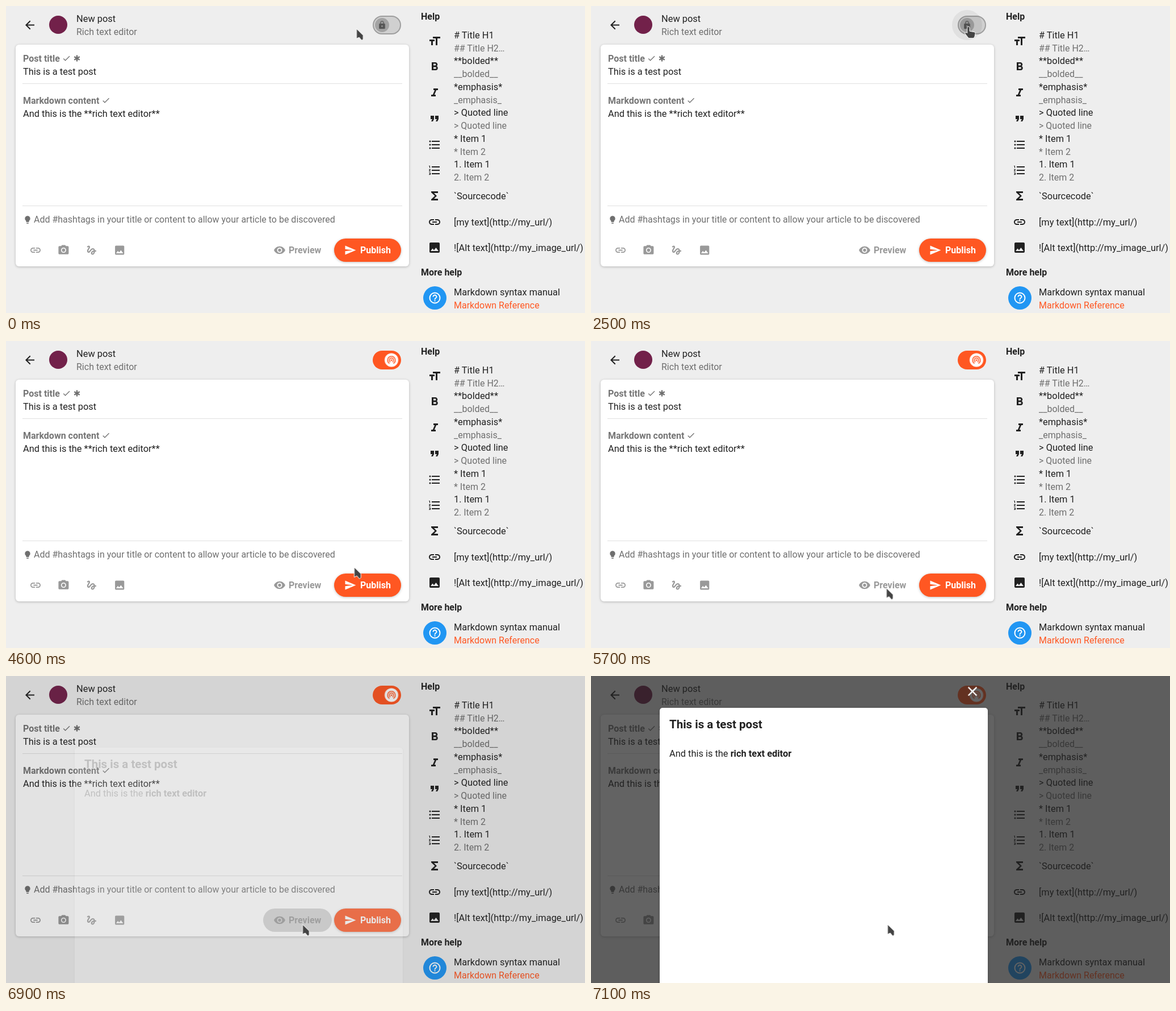
Write an HTML page that moves like this. It is 1020 by 540 pixels and loops after 8 s.

```html
<!DOCTYPE html>
<html lang="en">
<head>
<meta charset="utf-8">
<title>New post</title>
<style>
html, body { margin: 0; width: 100%; height: 100%; overflow: hidden; background: #eee; }
svg { display: block; }
text { font: 16.4px Roboto, sans-serif; fill: #212121; white-space: pre; }
.b { font-weight: 700; }
text.b, .label, .dim, .orange { font-size: 16px; }
text.title { font-size: 20.5px; }
.dim { fill: #6f6f6f; }
.label { font-weight: 700; fill: #757575; }
.tool { fill: #999; }
.orange { fill: #ff5722; }
.white { fill: #fff; }
.rule { stroke: #e0e0e0; }
.card { filter: drop-shadow(0 1px 2px rgba(0, 0, 0, .24)); }

/* 1.25% of the loop is 100 ms */
.a { animation: 8s -5ms step-end infinite; }
.cursor { animation-name: travel; }
.arrow { animation-name: arrow; }
.hand { animation-name: hand; }
.ring { animation-name: hand; }
.knob { animation-name: slide; }
.off { animation-name: off; }
.on { animation-name: on; }
.press { animation-name: press; }
.shade { animation-name: shade; }
.dialog { animation-name: rise; }
.close { animation-name: close; }

@keyframes travel {
  0% { transform: translate(617.5px, 40px); }
  6.25% { transform: translate(617.5px, 40px); animation-timing-function: steps(2); }
  8.75% { transform: translate(629px, 40px); animation-timing-function: steps(2); }
  11.25% { transform: translate(654px, 38px); animation-timing-function: steps(2); }
  13.75% { transform: translate(665px, 36px); }
  46.25% { transform: translate(665px, 36px); animation-timing-function: steps(3); }
  50% { transform: translate(660px, 96px); animation-timing-function: steps(3); }
  53.75% { transform: translate(632px, 310px); animation-timing-function: steps(3); }
  57.5% { transform: translate(613.5px, 398px); animation-timing-function: steps(4); }
  62.5% { transform: translate(512px, 425px); }
  66.25% { transform: translate(512px, 425px); animation-timing-function: steps(5); }
  72.5%, 100% { transform: translate(522.5px, 437px); }
}
@keyframes arrow {
  0%, 47.5% { opacity: 1; }
  11.25% { opacity: 0; }
  100% { opacity: 1; }
}
@keyframes hand {
  0%, 47.5% { opacity: 0; }
  11.25% { opacity: 1; }
  100% { opacity: 0; }
}
@keyframes slide {
  0% { transform: none; }
  33.75% { transform: translate(0); animation-timing-function: steps(3); }
  37.5%, 100% { transform: translate(16.5px); }
}
@keyframes off {
  0% { opacity: 1; }
  33.75% { opacity: 1; animation-timing-function: steps(3); }
  37.5%, 100% { opacity: 0; }
}
@keyframes on {
  0% { opacity: 0; }
  33.75% { opacity: 0; animation-timing-function: steps(3); }
  37.5%, 100% { opacity: 1; }
}
@keyframes press {
  0% { opacity: 0; }
  85%, 100% { opacity: 1; }
}
@keyframes shade {
  0% { opacity: 0; }
  86.25% { opacity: .127; }
  87.5% { opacity: .556; }
  88.75%, 100% { opacity: .7; }
}
@keyframes rise {
  0% { opacity: 0; transform: translateY(82px); }
  86.25% { opacity: .18; transform: translateY(70px); }
  87.5% { opacity: .81; transform: translateY(16px); }
  88.75%, 100% { opacity: 1; transform: none; }
}
@keyframes close {
  0% { opacity: 0; }
  88.75%, 100% { opacity: 1; }
}
</style>
</head>
<body>
<svg id="stage" width="1020" height="540" viewBox="0 0 1020 540">
  <g id="header">
    <circle cx="92" cy="33" r="16" fill="#72214a"/>
    <text x="124" y="28">New post</text>
    <text x="124" y="51" class="dim">Rich text editor</text>
  </g>

  <g id="toggle">
    <rect class="a off" x="647" y="18" width="48" height="31" rx="15.5" fill="#d0d0d0" stroke="#9e9e9e" stroke-width="2"/>
    <rect class="a on orange" x="646" y="17" width="50" height="33" rx="16.5"/>
    <g class="a knob">
      <circle class="a off" cx="662.5" cy="33.5" r="12.5" fill="#a3a3a3"/>
      <circle class="a on white" cx="662.5" cy="33.5" r="12"/>
      <g id="lock" class="a off"></g>
      <g id="cast" class="a on"></g>
      <circle class="a ring" cx="662.5" cy="33.5" r="26.5" opacity="0" fill="rgba(0,0,0,.06)"/>
    </g>
  </g>

  <g id="editor">
    <rect class="card white" x="17" y="68" width="693" height="390" rx="6"/>
    <text x="30" y="98" class="label">Post title</text>
    <path d="M125 86.5v11M120.2 89.2l9.6 5.6M120.2 94.8l9.6-5.6" stroke="#6f6f6f" stroke-width="2.4"/>
    <text x="30" y="121">This is a test post</text>
    <path class="rule" d="M29 136.5H698M29 351.5H698"/>
    <text x="30" y="172" class="label">Markdown content</text>
    <text x="30" y="195">And this is the **rich text editor**</text>
    <text x="49" y="381" class="dim">Add #hashtags in your title or content to allow your article to be discovered</text>
    <rect class="a press" x="453" y="409" width="121" height="41" rx="20.5" fill="#d5d5d5"/>
    <text x="498" y="435" class="b tool">Preview</text>
    <rect class="card orange" x="578" y="409" width="118" height="41" rx="20.5"/>
    <text x="624" y="435" class="b white">Publish</text>
  </g>

  <g id="help">
    <text x="731" y="24" class="b">Help</text>
    <text x="731" y="474" class="b">More help</text>
    <circle cx="755.5" cy="513.5" r="20.5" fill="#2196f3"/>
    <text x="789" y="509">Markdown syntax manual</text>
    <text x="789" y="532" class="orange">Markdown Reference</text>
  </g>

  <rect class="a shade" width="1020" height="540" fill="#212121"/>
  <g id="close" class="a close"></g>
  <g class="a dialog">
    <rect class="card white" x="121" y="56" width="578" height="600" rx="5"/>
    <text x="138" y="92" class="b title">This is a test post</text>
    <text x="138" y="142">And this is the <tspan class="b">rich text editor</tspan></text>
  </g>

  <g class="a cursor" stroke="#fff" fill="#444" stroke-linejoin="round">
    <path class="a arrow" d="M0 0V17.5L4.6 15 9.2 20.4 11.8 18.2V11.6z"/>
    <path class="a hand" d="M-2.3 2.3a2.2 2.2 0 0 1 4.4 0v6l8 1.4a2.6 2.6 0 0 1 2 3l-1.2 5q-.7 3-3 3H2q-2 0-3-1.5l-4.6-6a1.6 1.6 0 0 1 2.3-2.3l1 .8z"/>
  </g>
</svg>
<script>
const glyphs = {
  back: 'M20 11H7.83l5.59-5.59L12 4l-8 8 8 8 1.41-1.41L7.83 13H20z',
  size: 'M9 4v3h5v12h3V7h5V4zM3 12h3v7h3v-7h3V9H3z',
  bold: 'M15.6 10.79c.97-.67 1.65-1.77 1.65-2.79 0-2.26-1.75-4-4-4H7v14h7.04c2.09 0 3.71-1.7 3.71-3.79 0-1.52-.86-2.82-2.15-3.42zM10 6.5h3c.83 0 1.5.67 1.5 1.5s-.67 1.5-1.5 1.5h-3zm3.5 9H10v-3h3.5c.83 0 1.5.67 1.5 1.5s-.67 1.5-1.5 1.5z',
  italic: 'M10 4v3h2.21l-3.42 8H6v3h8v-3h-2.21l3.42-8H18V4z',
  quote: 'M6 17h3l2-4V7H5v6h3zm8 0h3l2-4V7h-6v6h3z',
  bullets: 'M2.5 12a1.5 1.5 0 1 0 3 0a1.5 1.5 0 1 0-3 0M2.5 6a1.5 1.5 0 1 0 3 0a1.5 1.5 0 1 0-3 0M2.5 18a1.5 1.5 0 1 0 3 0a1.5 1.5 0 1 0-3 0M7 19h14v-2H7zm0-6h14v-2H7zm0-8v2h14V5z',
  numbers: 'M2 17h2v.5H3v1h1v.5H2v1h3v-4H2zm1-9h1V4H2v1h1zm-1 3h1.8L2 13.1v.9h3v-1H3.2L5 10.9V10H2zm5-6v2h14V5zm0 14h14v-2H7zm0-6h14v-2H7z',
  sigma: 'M18 4H6v2l6.5 6L6 18v2h12v-3h-7l5-5-5-5h7z',
  link: 'M3.9 12c0-1.71 1.39-3.1 3.1-3.1h4V7H7c-2.76 0-5 2.24-5 5s2.24 5 5 5h4v-1.9H7c-1.71 0-3.1-1.39-3.1-3.1zM8 13h8v-2H8zm9-6h-4v1.9h4c1.71 0 3.1 1.39 3.1 3.1s-1.39 3.1-3.1 3.1h-4V17h4c2.76 0 5-2.24 5-5s-2.24-5-5-5z',
  image: 'M21 19V5c0-1.1-.9-2-2-2H5c-1.1 0-2 .9-2 2v14c0 1.1.9 2 2 2h14c1.1 0 2-.9 2-2zM8.5 13.5l2.5 3.01L14.5 12l4.5 6H5z',
  help: 'M11 18h2v-2h-2zm1-16a10 10 0 1 0 0 20a10 10 0 1 0 0-20zm0 18a8 8 0 1 1 0-16a8 8 0 1 1 0 16zm0-14c-2.21 0-4 1.79-4 4h2c0-1.1.9-2 2-2s2 .9 2 2c0 2-3 1.75-3 5h2c0-2.25 3-2.5 3-5 0-2.21-1.79-4-4-4z',
  check: 'M9 16.17L4.83 12l-1.42 1.41L9 19 21 7l-1.41-1.41z',
  camera: 'M9 2L7.17 4H4c-1.1 0-2 .9-2 2v12c0 1.1.9 2 2 2h16c1.1 0 2-.9 2-2V6c0-1.1-.9-2-2-2h-3.17L15 2zm3 15a5 5 0 1 1 0-10a5 5 0 1 1 0 10zM8.8 12a3.2 3.2 0 1 0 6.4 0a3.2 3.2 0 1 0-6.4 0',
  gesture: 'M4.59 6.89c.7-.71 1.4-1.35 1.71-1.22.5.2 0 1.03-.3 1.52-.25.42-2.86 3.89-2.86 6.31 0 1.28.48 2.34 1.34 2.98.75.56 1.74.73 2.64.46 1.07-.31 1.95-1.4 3.06-2.77 1.21-1.49 2.83-3.44 4.08-3.44 1.63 0 1.65 1.01 1.76 1.79-3.78.64-5.38 3.67-5.38 5.37 0 1.7 1.44 3.09 3.21 3.09 1.63 0 4.29-1.33 4.69-6.1H21v-2.5h-2.47c-.15-1.65-1.09-4.2-4.03-4.2-2.25 0-4.18 1.91-4.94 2.84-.58.73-2.06 2.48-2.29 2.72-.25.3-.68.84-1.11.84-.45 0-.72-.83-.36-1.92.35-1.09 1.4-2.86 1.85-3.52.78-1.14 1.3-1.92 1.3-3.28C8.95 3.69 7.31 3 6.44 3 5.12 3 3.97 4 3.72 4.25l-.88.93zm9.29 11.66c-.31 0-.74-.26-.74-.72 0-.6.73-2.2 2.87-2.76-.3 2.69-1.43 3.48-2.13 3.48z',
  eye: 'M12 4.5C7 4.5 2.73 7.61 1 12c1.73 4.39 6 7.5 11 7.5s9.27-3.11 11-7.5c-1.73-4.39-6-7.5-11-7.5zM12 17a5 5 0 1 1 0-10a5 5 0 1 1 0 10zm0-8a3 3 0 1 0 0 6a3 3 0 1 0 0-6z',
  send: 'M2.01 21L23 12 2.01 3 2 10l15 2-15 2z',
  lock: 'M18 8h-1V6c0-2.76-2.24-5-5-5S7 3.24 7 6v2H6c-1.1 0-2 .9-2 2v10c0 1.1.9 2 2 2h12c1.1 0 2-.9 2-2V10c0-1.1-.9-2-2-2zm-6 9a2 2 0 1 1 0-4a2 2 0 1 1 0 4zm3.1-9H8.9V6c0-1.71 1.39-3.1 3.1-3.1s3.1 1.39 3.1 3.1z',
  cast: 'M12 11a2 2 0 1 0 0 4a2 2 0 1 0 0-4zm6 2a6 6 0 1 0-9 5.19l1-1.74a4 4 0 1 1 4 0l1 1.74A6 6 0 0 0 18 13zM12 3A10 10 0 0 0 6.99 21.65l1-1.73a8 8 0 1 1 8.01 0l1 1.73A10 10 0 0 0 12 3z',
  close: 'M19 6.41L17.59 5 12 10.59 6.41 5 5 6.41 10.59 12 5 17.59 6.41 19 12 13.41 17.59 19 19 17.59 13.41 12z',
  bulb: 'M9 21c0 .55.45 1 1 1h4c.55 0 1-.45 1-1v-1H9zm3-19C8.14 2 5 5.14 5 9c0 2.38 1.19 4.47 3 5.74V17c0 .55.45 1 1 1h6c.55 0 1-.45 1-1v-2.26c1.81-1.27 3-3.36 3-5.74 0-3.86-3.14-7-7-7z'
};

function add(parent, tag, attrs) {
  const el = document.createElementNS('http://www.w3.org/2000/svg', tag);
  for (const key in attrs) el.setAttribute(key, attrs[key]);
  return document.getElementById(parent).appendChild(el);
}

function icon(parent, name, x, y, size = 24, fill = '#212121') {
  const k = size / 24;
  add(parent, 'path', {
    d: glyphs[name], fill, 'fill-rule': 'evenodd',
    transform: `translate(${x - size / 2} ${y - size / 2}) scale(${k})`
  });
}

function line(y, text, cls = '') {
  add('help', 'text', { x: 789, y: Math.round(y), class: cls }).textContent = text;
}

icon('header', 'back', 42, 33.5);
icon('lock', 'lock', 662.5, 33.5, 16, '#555');
icon('cast', 'cast', 662.5, 33, 18, '#ff5722');
icon('editor', 'check', 106.5, 92, 16, '#757575');
icon('editor', 'check', 176, 166, 16, '#757575');
icon('editor', 'bulb', 38, 376, 16, '#6f6f6f');
['link', 'camera', 'gesture', 'image'].forEach((name, i) =>
  icon('editor', name, 52 + 49.4 * i, 429.5, 21.6, '#999'));
icon('editor', 'eye', 482, 429.5, 21.6, '#999');
icon('editor', 'send', 606.5, 429.5, 21.6, '#fff');
icon('help', 'help', 755.5, 513.5, 24, '#fff');
icon('close', 'close', 672, 27, 28, '#fff');

[
  ['size', '# Title H1', '## Title H2…'],
  ['bold', '**bolded**', '__bolded__'],
  ['italic', '*emphasis*', '_emphasis_'],
  ['quote', '> Quoted line', '> Quoted line'],
  ['bullets', '* Item 1', '* Item 2'],
  ['numbers', '1. Item 1', '2. Item 2'],
  ['sigma', '`Sourcecode`'],
  ['link', '[my text](http://my_url/)'],
  ['image', '![Alt text](http://my_image_url/)']
].forEach(([name, first, second], i) => {
  const y = 62 + 45.4 * i;
  icon('help', name, 755, Math.round(y));
  line(second ? y - 5 : y + 5.7, first);
  if (second) line(y + 17.9, second, 'dim');
});
</script>
</body>
</html>
```
